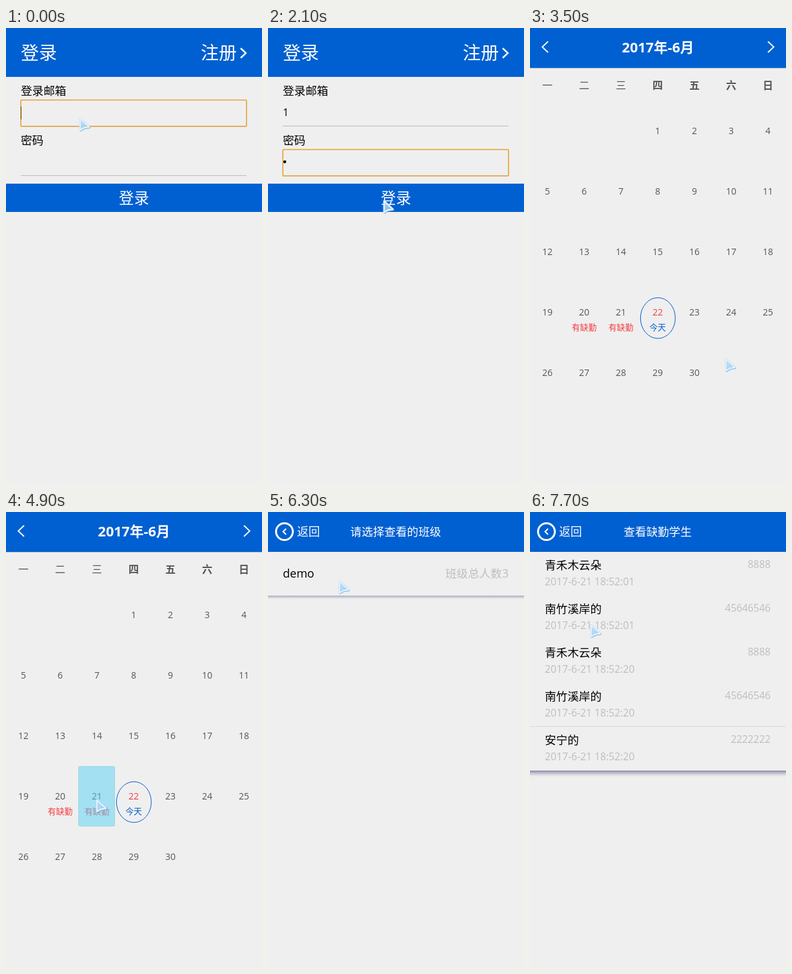
An HTML page that plays this animation: 397x709 px, repeating every 8 s.

```html
<!DOCTYPE html>
<html lang="zh-CN">
<head>
<meta charset="utf-8">
<title>考勤</title>
<style>
  html, body { margin: 0; width: 100%; height: 100%; overflow: hidden; background: #efefef; }
  svg { display: block; width: 397px; height: 709px; font-family: "Open Sans", "Noto Sans CJK SC", "Noto Sans CJK", sans-serif; }
</style>
</head>
<body>
<svg id="stage" viewBox="0 0 397 709">
  <defs>
    <linearGradient id="glass" x1="0" y1="0" x2="1" y2="1">
      <stop offset="0" stop-color="#c3e2f8"/>
      <stop offset="1" stop-color="#8cc6f0"/>
    </linearGradient>
    <linearGradient id="shade" x1="0" y1="0" x2="0" y2="1">
      <stop offset="0" stop-color="#7f7c9c" stop-opacity=".9"/>
      <stop offset=".4" stop-color="#a09eb6" stop-opacity=".6"/>
      <stop offset="1" stop-color="#c8c8d8" stop-opacity="0"/>
    </linearGradient>
  </defs>
  <g id="screen"></g>
  <g id="pointer" stroke-linejoin="round">
    <path d="M2.4 2.4V20L8.4 16.4L16.2 15.2Z" fill="none" stroke="#6fb0e6" stroke-width="2.6" opacity=".7" transform="translate(.5 .7)"/>
    <path d="M2 2V19.6L8 16L15.8 14.8Z" fill="url(#glass)" fill-opacity=".85" stroke="#b9d9f3" stroke-width="2.8"/>
    <path d="M2 2V19.6L8 16L15.8 14.8Z" fill="none" stroke="#f4faff" stroke-width="1.3"/>
  </g>
</svg>
<script>
const BLUE = '#0060d1', RED = '#f43b42', INK = '#555', PALE = '#bebebe';
const STEP = 700, LOOP = 8000;
const screen = document.getElementById('screen');
const pointer = document.getElementById('pointer');

const text = (x, y, size, fill, str, anchor = 'start', weight = 400) =>
  `<text x="${x}" y="${y}" font-size="${size}" fill="${fill}" text-anchor="${anchor}" font-weight="${weight}">${str}</text>`;
const rect = (x, y, w, h, fill, extra = '') =>
  `<rect x="${x}" y="${y}" width="${w}" height="${h}" fill="${fill}" ${extra}/>`;
const line = (d, width, color = '#fff') =>
  `<path d="${d}" fill="none" stroke="${color}" stroke-width="${width}"/>`;

function login(focus, email = '', password = '') {
  const fieldY = focus === 'email' ? 112 : 189;
  return rect(0, 0, 397, 76, BLUE)
    + text(23, 49, 28, '#fff', '登录')
    + text(302, 49, 28, '#fff', '注册')
    + line('M364 31.5L372 39L364 46.5', 2.4)
    + text(23, 104, 17.6, '#000', '登录邮箱')
    + text(23, 181, 17.6, '#000', '密码')
    + line('M23 152.5H373M23 229.5H373', 1, '#bbb')
    + rect(23, fieldY, 350, 41, 'none', 'rx="1" stroke="#e5a23a" stroke-width="1.6"')
    + (email ? text(23, 137, 16, '#000', email) : line('M23.5 122V142', 1, '#6b4a10'))
    + (password ? '<circle cx="26" cy="208" r="2.3"/>' : '')
    + rect(0, 242, 397, 44, BLUE)
    + text(198.5, 273, 23.4, '#fff', '登录', 'middle');
}

function calendar(opacity, pressed) {
  const colX = i => 27 + 57 * i;
  let s = rect(0, 0, 397, 62, BLUE) + rect(0, 62, 397, 1, '#c0c0c0')
    + line('M28 21L19 29.5L28 38M369 21L378 29.5L369 38', 1.8)
    + text(198.5, 38, 21.6, '#fff', '2017年-6月', 'middle', 700);
  [...'一二三四五六日'].forEach((day, i) => {
    s += text(colX(i), 94.5, 16, INK, day, 'middle', i < 3 ? 300 : 700);
  });
  for (let day = 1; day <= 30; day++) {
    const cell = day + 2, x = colX(cell % 7), y = 165 + 94 * Math.floor(cell / 7);
    s += text(x, y, 14, day === 22 ? RED : INK, day, 'middle');
    if (day === 20 || day === 21) s += text(x, y + 23, 12.8, RED, '有缺勤', 'middle');
    if (day === 22) {
      s += text(x, y + 23, 12.8, BLUE, '今天', 'middle')
        + `<ellipse cx="198.3" cy="451" rx="27" ry="31.7" fill="none" stroke="${BLUE}"/>`;
    }
  }
  if (pressed) s += rect(112.5, 395.5, 56, 93, '#57d3f5', 'rx="2" stroke="#62bdd4" opacity=".5"');
  return `<g opacity="${opacity}">${s}</g>`;
}

const backBar = title => rect(0, 0, 397, 62, BLUE)
  + '<circle cx="25.5" cy="30.5" r="13" fill="none" stroke="#fff" stroke-width="3"/>'
  + line('M28 26L23.5 30.5L28 35', 2)
  + text(45, 37, 17.8, '#fff', '返回')
  + text(198, 37, 17.6, '#fff', title, 'middle');

const classes = () => backBar('请选择查看的班级')
  + text(23, 102, 18, '#000', 'demo')
  + text(373, 102, 17.6, PALE, '班级总人数3', 'end')
  + rect(0, 130, 397, 6, 'url(#shade)', 'opacity=".7"');

function absentees() {
  const [a, b, c] = [['青禾木云朵', '8888'], ['南竹溪岸的', '45646546'], ['安宁的', '2222222']];
  let s = backBar('查看缺勤学生');
  [a, b, a, b, c].forEach(([name, id], i) => {
    const y = 68 * i;
    s += text(23, 89 + y, 17.6, '#000', name)
      + text(373, 87 + y, 15.4, PALE, id, 'end')
      + text(23, 114 + y, 15.7, PALE, `2017-6-21 18:52:${i < 2 ? '01' : '20'}`);
  });
  return s + line('M0 333.5H397', 1, '#dadada') + rect(0, 402, 397, 10, 'url(#shade)');
}

// Each step: pointer position, then the screen under it.
const steps = [
  [113, 139, () => login('email')],
  [72, 96, () => login('email', '1')],
  [29, 96, () => login('password', '1', '1')],
  [178, 267, () => login('password', '1', '1')],
  [176, 262, () => calendar(0.2)],
  [302, 513, () => calendar(1)],
  [132, 449, () => calendar(1)],
  [139, 446, () => calendar(1, true)],
  [132, 155, classes],
  [109, 106, classes],
  [122, 333, absentees],
  [93, 174, absentees]
];

let shown = -1;
function update(now) {
  const index = Math.floor((now % LOOP) / STEP);
  if (index !== shown) {
    const [x, y, draw] = steps[index];
    screen.innerHTML = draw();
    pointer.setAttribute('transform', `translate(${x} ${y})`);
    shown = index;
  }
}

let start;
function frame(now) {
  start ??= now;
  update(now - start);
  requestAnimationFrame(frame);
}
update(0);
requestAnimationFrame(frame);
</script>
</body>
</html>
```
